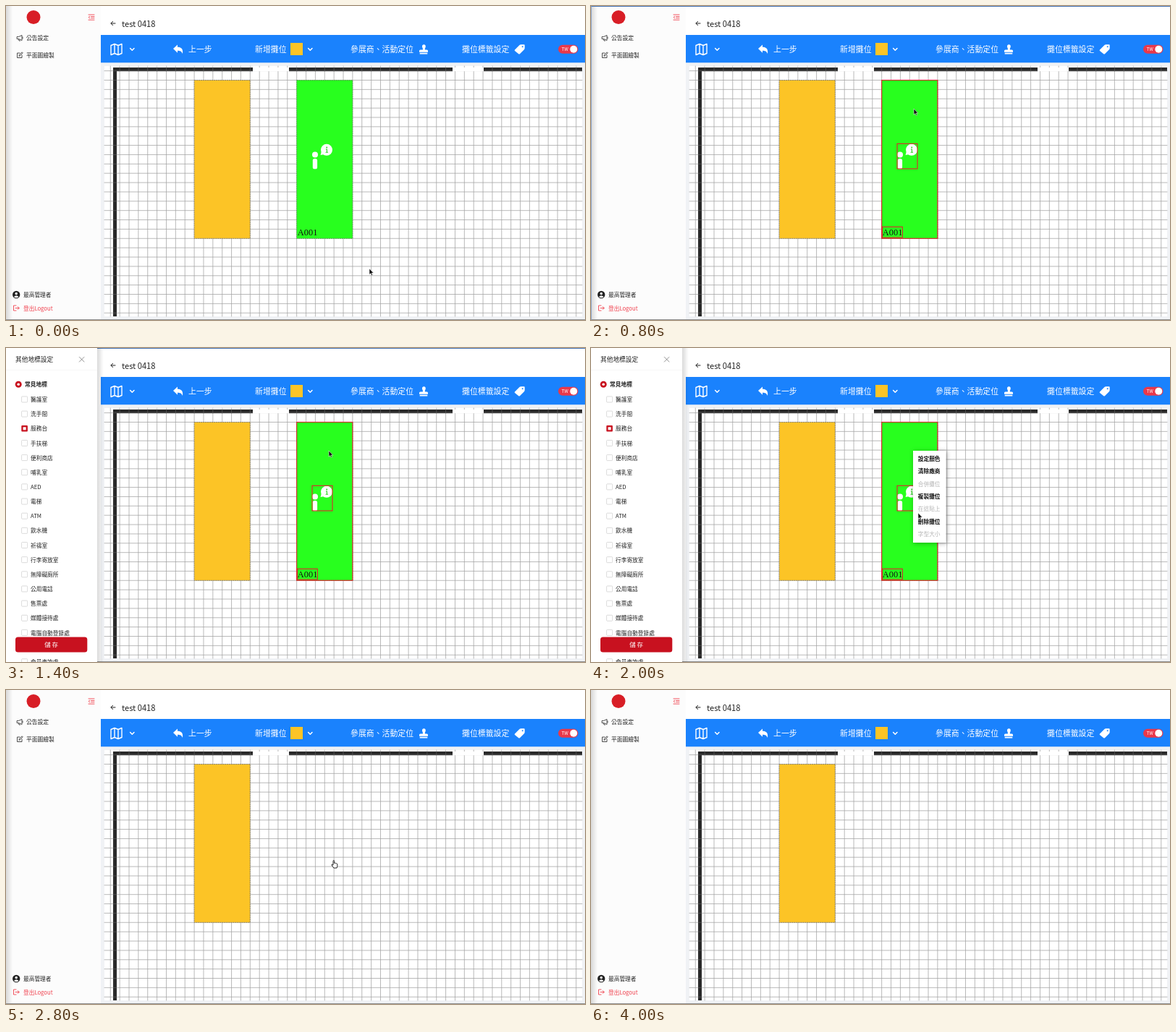
Animation, 800 px wide and 434 px high, one loop 4.1 s. Source, as an HTML page:

```html
<!DOCTYPE html>
<html lang="zh-Hant">
<head>
<meta charset="utf-8">
<title>Floor plan editor</title>
<style>
html, body { margin: 0; width: 100%; height: 100%; overflow: hidden; background: #fff; }
svg { display: block; width: 800px; height: 434px; }
text { font-family: "Noto Sans CJK TC", "Noto Sans CJK", "Noto Sans", sans-serif; white-space: pre; }
.line { fill: none; stroke-linecap: round; stroke-linejoin: round; }
</style>
</head>
<body>
<svg id="stage" viewBox="0 0 800 434"></svg>
<script>
const RED = '#c8111f', CORAL = '#f0424f', YELLOW = '#fcc426', INK = '#222';
const CELL = 12.87, LEFT = 260.1, TOP = 102.5;

const rect = (x, y, w, h, fill, more = '') =>
  `<rect x="${x}" y="${y}" width="${w}" height="${h}" fill="${fill}" ${more}/>`;
const circle = (x, y, r, fill, more = '') =>
  `<circle cx="${x}" cy="${y}" r="${r}" fill="${fill}" ${more}/>`;
const line = (d, color, width = 1, more = '') =>
  `<path class="line" d="${d}" stroke="${color}" stroke-width="${width}" ${more}/>`;
const shape = (d, fill, more = '') => `<path d="${d}" fill="${fill}" ${more}/>`;
// y is the vertical middle of the glyphs
const text = (x, y, size, str, fill = INK, more = '') =>
  `<text x="${x}" y="${y + size * .37}" font-size="${size}" fill="${fill}" ${more}>${str}</text>`;
const group = (id, body, more = '') => `<g id="${id}" ${more}>${body}</g>`;

function gridPath() {
  let d = '';
  for (let x = LEFT - 9 * CELL; x < 796; x += CELL) d += `M${x.toFixed(2)} 83V429`;
  for (let y = TOP - CELL; y < 429; y += CELL) d += `M136 ${y.toFixed(2)}H796`;
  return d;
}

function plan() {
  const walls = [[148, 85, 5, 344], [148, 85, 193, 5.2], [391, 85, 226, 5.2], [660, 85, 136, 5.2]];
  const clip = walls.map(w => rect(...w, '#000')).join('');
  return rect(131, 78, 669, 356, '#f0f2f5') + rect(136, 83, 660, 346, '#fff') +
    line(gridPath(), '#a2a2a2', .75) +
    rect(341, 85, 50, 5.2, '#fff') + rect(617, 85, 43, 5.2, '#fff') +
    walls.map(w => rect(...w, '#2a2a2a')).join('') +
    `<clipPath id="walls">${clip}</clipPath>` +
    line(gridPath(), '#666', .6, 'clip-path="url(#walls)"') +
    rect(LEFT, TOP, 6 * CELL, 17 * CELL, YELLOW, 'stroke="#777" stroke-width=".8" stroke-dasharray="2 1"');
}

function booth() {
  const x = LEFT + 11 * CELL, w = 6 * CELL, h = 17 * CELL;
  const outline = 'stroke="#e0222c" stroke-width="1.1"';
  return rect(x, TOP, w, h, '#28ff1e', 'stroke="#5a8a55" stroke-width=".8" stroke-dasharray="2 1"') +
    circle(427, 205.5, 4, '#fff') + rect(423.8, 211, 6.3, 14.3, '#fff', 'rx="2.6"') +
    circle(443, 198.8, 8, '#fff') + shape('M436 201L434.5 206L440 205z', '#fff') +
    circle(443.2, 195.4, 1, '#28d81e') + line('M442.3 198H443.4V202M442 202.2H444.6', '#28d81e', 1.1) +
    `<text x="402.8" y="316.8" font-size="12.4" fill="#111" style="font-family:'Liberation Serif',serif">A001</text>` +
    group('selection', rect(x, TOP, w, h, 'none', outline) +
      rect(423, 190.3, 28, 34.7, 'none', outline) + rect(402.5, 305.3, 27.8, 14.7, 'none', outline));
}

function toolbar() {
  const W = '#fff', label = (x, s) => text(x, 60, 10.9, s, W);
  const chevron = x => line(`M${x - 2.7} 58.5l2.7 2.8 2.7-2.8`, W, 1.5);
  return rect(131, 0, 669, 40, '#fff') + line('M151 24H145M147.6 21.3L145 24l2.6 2.7', INK, 1) +
    text(160, 24.6, 11.1, 'test 0418') + rect(131, 40, 669, 38.3, '#1a82fd') +
    line('M145 54.5l5-2 5 2 5-2V65.5l-5 2-5-2-5 2zM150 52.5v13M155 54.5v13', W, 1.4) + chevron(174.3) +
    shape('M231 59l6-5.5v3.2c5 0 8 2.5 7 9.3-1.3-3.4-3.4-4.3-7-4.3v3z', W) + label(252, '上一步') +
    label(344, '新增攤位') + rect(393, 51, 17, 17, YELLOW) + chevron(420.3) +
    label(476, '參展商、活動定位') +
    shape('M575.8 60.5c.8-1.8-.8-3-.8-4.6a2.4 2.6 0 0 1 4.8 0c0 1.600-1.600 2.800-.8 4.600h2.500q1.500 0 1.500 1.500v1.800h-12v-1.800q0-1.500 1.500-1.500zM571.700 64.800h10.600v1.800h-10.600z', W) +
    label(630, '攤位標籤設定') +
    shape('M703 60.500l6.500-6.500q.8-.8 2-.8h4.200q1 0 1 1v4q0 1.200-.8 2l-6 6q-.8.800-1.600 0l-5.300-4.300q-.7-.7 0-1.400z', W) +
    circle(713.7, 56.2, 1, '#1a82fd') +
    rect(763, 53.700, 27.500, 12, '#e9384a', 'rx="6"') + text(767.500, 59.800, 6.300, 'TW', W) + circle(784.300, 59.700, 5, W);
}

function sidebar() {
  return `<linearGradient id="edge"><stop stop-color="#d8d8d8"/><stop offset="1" stop-color="#fcfcfc"/></linearGradient>` +
    rect(0, 0, 131, 434, '#fcfcfc') + rect(0, 0, 9, 434, 'url(#edge)') +
    circle(38, 15.500, 9.500, '#d81e26') +
    line('M114 12h8M117.500 14.500h4.500M117.500 16.700h4.500M114 19.200h8M115.800 14.200L114 15.600l1.800 1.400', CORAL, .9) +
    line('M15.500 42.500h2l4.500-2v7l-4.500-2h-2zM17.500 46l.5 2h1.500M23 43v2', INK, .8) + text(28, 44, 7.75, '公告設定') +
    line('M19 65h-3.500v6.500h6.500V68M18 69l.3-1.500 3.900-3.700 1 1-3.800 3.800z', INK, .8) + text(28, 68, 7.75, '平面圖繪製') +
    circle(14.200, 399, 5.200, INK) + circle(14.200, 397.500, 1.700, '#fff') + shape('M10.900 402q3.300-3.600 6.600 0q-3.300 2.600-6.600 0z', '#fff') +
    text(24, 399.500, 7.700, '最高管理者', INK, 'font-weight="500"') +
    line('M14 414h-3.500v7H14M13 417.500h5M16.200 415.500l2 2-2 2', CORAL, .9) + text(24, 418, 7.700, '登出Logout', CORAL);
}

function drawer() {
  const items = ('醫護室 洗手間 服務台 手扶梯 便利商店 哺乳室 AED 電梯 ATM 飲水機 祈禱室 行李寄放室 無障礙廁所 ' +
    '公用電話 售票處 媒體接待處 電腦自動登錄處 團體報到處 會員查詢處').split(' ');
  const rows = items.map((name, i) => {
    const y = 71 + i * 20.15;
    const box = i === 2
      ? rect(21.300, y - 4.300, 8.600, 8.600, RED, 'rx="1"') + rect(23.600, y - 2, 4, 4, '#fff')
      : rect(21.600, y - 4, 8, 8, '#fff', 'rx=".8" stroke="#d2d2d2" stroke-width=".8"');
    return box + text(34, y + .3, 7.700, name);
  }).join('');
  return `<linearGradient id="shade"><stop stop-color="#000" stop-opacity=".13"/><stop offset="1" stop-color="#000" stop-opacity="0"/></linearGradient>` +
    rect(126, 0, 9, 434, 'url(#shade)') + rect(0, 0, 126, 434, '#fff') +
    text(13, 16, 8.700, '其他地標設定') + line('M101.300 12.500l6.600 6.600m0-6.600l-6.600 6.600', '#777', .8) +
    rect(0, 30.500, 126, .6, '#f2f2f2') +
    circle(17.200, 50.300, 4.500, RED) + circle(17.200, 50.300, 1.800, '#fff') +
    text(26, 50.500, 7.750, '常見地標', INK, 'font-weight="700"') + rows +
    rect(13, 399.500, 99.300, 21, RED, 'rx="3.500"') +
    text(62.600, 410.300, 8.500, '儲 存', '#fff', 'text-anchor="middle" font-weight="500"');
}

function menu() {
  const items = ['設定顏色', '清除廠商', '合併攤位', '複製攤位', '在這貼上', '刪除攤位', '字型大小'];
  return rect(445, 142, 45.500, 127, '#fff', 'style="filter:drop-shadow(1px 1px 3px #0005)"') +
    rect(445, 231.300, 45.500, 17.300, '#eee', 'id="hover"') +
    items.map((s, i) => {
      const off = i === 2 || i === 4 || i === 6;
      return text(451.800, 153 + i * 17.350, 7.700, s, off ? '#b5b5b5' : '#111', `font-weight="${off ? 400 : 700}"`);
    }).join('');
}

const pointer = group('arrow', shape('M0 0V8.300L1.900 6.600 3.200 9.400 4.500 8.800 3.200 6.100H5.800z', '#111', 'stroke="#fff" stroke-width=".5"')) +
  group('hand', shape('M-2-1q0-1 .8-1t.8 1V2l1-.4 1 .3 1 .3 1.200.8v3L3 8.500H-1.200L-4 4.500q-.4-1 .7-.9l1.300 1z', '#fff', 'stroke="#111" stroke-width=".9"'));

const stage = document.getElementById('stage');
stage.innerHTML = rect(0, 0, 800, 434, '#fff') + plan() + group('booth', booth()) + toolbar() + sidebar() +
  rect(0, 433, 800, 1, '#8c8c8c') +
  group('frame', rect(0, 0, 800, 1, '#4573b4') + rect(0, 0, .8, 434, '#7f9cc6')) +
  group('drawer', drawer()) + group('menu', menu()) + group('cursor', pointer);

const part = id => document.getElementById(id);
const show = (id, on) => part(id).style.display = on ? '' : 'none';
const move = (id, x, y) => part(id).setAttribute('transform', `translate(${x} ${y})`);
const clamp = v => Math.min(1, Math.max(0, v));
const easeOut = v => 1 - (1 - clamp(v)) ** 3;

// time, x, y
const track = [[0, 502, 363], [100, 502, 363], [700, 446, 142], [1700, 446, 142], [2000, 452, 228],
  [2200, 454, 237.500], [3100, 454, 237.500], [3500, 520, -20], [4100, 520, -20]];

function cursorAt(t) {
  const i = track.findIndex(k => k[0] > t), a = track[i - 1], b = track[i];
  const u = (t - a[0]) / (b[0] - a[0]), s = u * u * (3 - 2 * u);
  return [a[1] + (b[1] - a[1]) * s, a[2] + (b[2] - a[2]) * s];
}

function draw() {
  const t = Math.floor(performance.now() % 4100 / 100) * 100;
  const open = easeOut((t - 1000) / 300) - easeOut((t - 2500) / 300);
  const overDelete = t >= 2100 && t < 3200;
  show('booth', t < 2600);
  show('selection', t >= 700);
  show('frame', t >= 700 && t < 1700);
  show('drawer', open > 0);
  move('drawer', -135 * (1 - open), 0);
  show('menu', t >= 1700 && t < 2600);
  show('hover', overDelete);
  show('hand', overDelete);
  show('arrow', !overDelete);
  move('cursor', ...cursorAt(t));
  requestAnimationFrame(draw);
}
draw();
</script>
</body>
</html>
```
